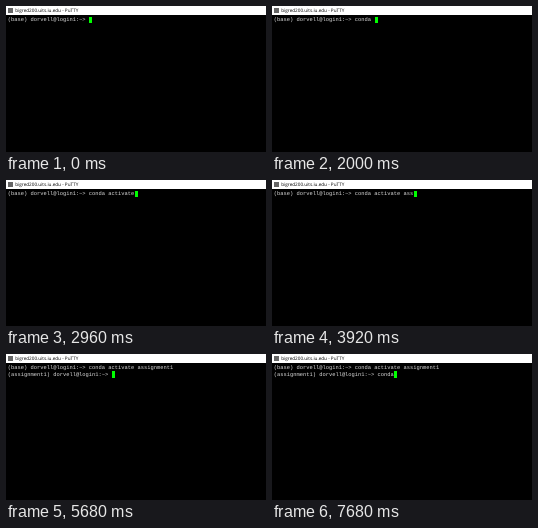
An HTML page that plays this animation: 260x146 px, repeating every 8000 ms.

```html
<!DOCTYPE html>
<html lang="en">
<head>
<meta charset="utf-8">
<title>Terminal</title>
<style>
  html, body {
    margin: 0;
    width: 100%;
    height: 100%;
    overflow: hidden;
    background: #000;
  }
  #stage {
    position: relative;
    width: 260px;
    height: 146px;
    overflow: hidden;
    background: #000;
    text-rendering: geometricPrecision;
  }
  #bar {
    position: absolute;
    inset: 0 0 auto;
    height: 9px;
    background: #fff;
    color: #000;
    font: 4.65px/9px "Open Sans", sans-serif;
  }
  #icon {
    position: absolute;
    left: 2px;
    top: 2px;
    width: 5px;
    height: 5px;
    background: #666;
  }
  #bar span {
    position: absolute;
    left: 9.3px;
    top: 0.6px;
    white-space: pre;
  }
  .row {
    position: absolute;
    left: 1.75px;
    color: #ddd;
    font: 5.417px/6.75px "Liberation Mono", monospace;
    white-space: pre;
  }
  #cursor {
    position: absolute;
    width: 3.4px;
    height: 6.4px;
    margin-top: -0.2px;
    background: #0f0;
  }
</style>
</head>
<body>
<div id="stage">
  <div id="bar"><i id="icon"></i><span>bigred200.uits.iu.edu - PuTTY</span></div>
  <div id="cursor"></div>
</div>
<script>
  const LOOP = 8000, CELL = 3.25, LEFT = 1.75, TOP = 10.8, LINE = 6.75;
  const STEP = 80, ENTER = 5280, READY = 5680;
  const user = "dorvell@login1:~> ";

  // Bursts of typing: start time and the keys, one per step
  const first = [
    [1200, "conda"], [1760, " "], [2160, "ac"], [2480, "tivate"],
    [3120, " "], [3520, "a"], [3760, "ss"], [4080, "ign"],
    [4560, "m"], [4720, "ent"], [5040, "1"]
  ];
  const second = [[7120, "c"], [7280, "ond"], [7600, "a"]];

  const stage = document.getElementById("stage");
  const cursor = document.getElementById("cursor");
  const rows = [0, 1].map(i => {
    const row = document.createElement("div");
    row.className = "row";
    row.style.top = TOP + i * LINE + "px";
    stage.insertBefore(row, cursor);
    return row;
  });

  const typed = (bursts, t) => bursts.map(([start, keys]) =>
    keys.slice(0, Math.max(0, Math.floor((t - start) / STEP) + 1))).join("");

  function draw(t) {
    const lines = [
      "(base) " + user + typed(first, t),
      t < READY ? "" : "(assignment1) " + user + typed(second, t)
    ];
    lines.forEach((text, i) => {
      if (rows[i].textContent !== text) rows[i].textContent = text;
    });
    const line = t < ENTER ? 0 : 1;
    cursor.style.left = LEFT + lines[line].length * CELL + "px";
    cursor.style.top = TOP + line * LINE + "px";
  }

  const origin = performance.now();
  function tick() {
    draw((performance.now() - origin) % LOOP);
    requestAnimationFrame(tick);
  }
  tick();
</script>
</body>
</html>
```
